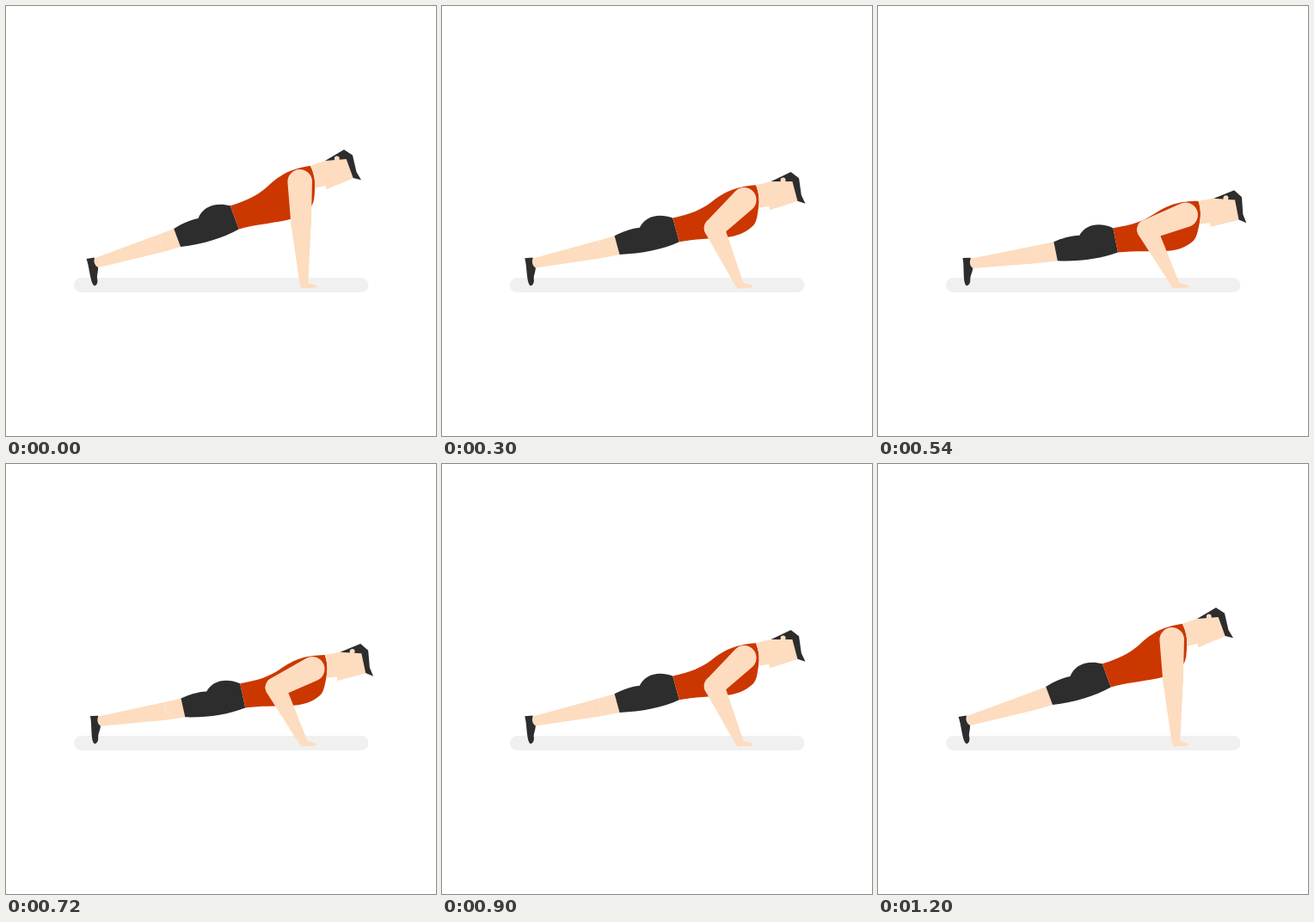
An HTML page for the animation above (1.24 s loop, 500 px wide and 500 px high).

```html
<!DOCTYPE html>
<html lang="en">
<head>
<meta charset="utf-8">
<title>Push-up</title>
<style>
  html, body { margin: 0; width: 100%; height: 100%; overflow: hidden; background: #fff; }
  svg { display: block; width: 100%; height: 100%; }
  .skin { fill: #fddcbf; }
  .dark { fill: #2d2d2d; }
  .shirt { fill: #cc3700; }
</style>
</head>
<body>
<svg viewBox="0 0 500 500">
  <rect x="79" y="316" width="342.5" height="17" rx="8.5" fill="#f0f0f0"/>
  <g id="body">
    <path class="dark" d="M93.5 294L102.5 292.5L107 303.5C107.5 309 105 314 106.3 318C107 323 104.500 325.500 102.800 325.300C100 324 98.500 317 97 309C96 303 95 298 93.500 294Z"/>
    <path class="skin" d="M103 293.300L177.500 265.700L181.700 286.300L107.500 304C103.500 303 101.300 297 103 293.300Z"/>
    <path class="skin" d="M177.500 265.700L195.500 259L203 280L181.700 286.300Z"/>
    <path class="dark" d="M195.200 259C204 253.500 213 249 223.500 247C228 234 243 227.500 260.800 232.300L270.800 259.500C252 270 229 277 203 280Z"/>
    <path class="shirt" d="M260.800 232.300C281 226 293 220 304 210C320 195 332 189.500 353.800 185.800C358 194 360 203 359 214C358.500 224 358 230 354 234C346 243 336 247 324 249.500C306 253 288 254.500 270.800 259.500Z"/>
    <path class="skin" d="M353.800 185.800L371.500 179.800L371.500 208.800L359.200 212C360 203 358 194 353.800 185.800Z"/>
    <path class="skin" d="M364.300 187L371.500 179.500L396 177.500L404.500 200L372.500 213.300Z"/>
    <path class="dark" d="M371 180L393 167L403 173.500L407.500 193L413 202.300L403.700 200L395.700 178Z"/>
    <circle class="skin" cx="384.800" cy="177.400" r="3"/>
  </g>
  <path class="skin" d="M342 326L344 328.500L360.500 327.500Q361.700 325.500 359 324.300L350 322Z"/>
  <path class="skin" id="upper"/>
  <path class="skin" id="fore"/>
</svg>
<script>
const $ = id => document.getElementById(id);
const TOE = { x: 103, y: 325 };
const SHOULDER = { x: 341.7, y: 204, r: 14.3 };
const WRIST = { x: 346.5, y: 325, r: 4.7 };
const ELBOW_R = 11.8, UPPER = 48, FORE = 73.1;
const LOOP = 1240, MOVE = 1200, STEP = 20, MAX_DEG = 10;

function turn(p, deg) {
  const a = deg * Math.PI / 180, c = Math.cos(a), s = Math.sin(a);
  const x = p.x - TOE.x, y = p.y - TOE.y;
  return { x: TOE.x + x * c - y * s, y: TOE.y + x * s + y * c, r: p.r };
}

// Two-bone solve: the elbow bends back between shoulder and fixed wrist.
function bend(s) {
  const dx = WRIST.x - s.x, dy = WRIST.y - s.y, d = Math.hypot(dx, dy);
  const along = (UPPER ** 2 - FORE ** 2 + d * d) / (2 * d);
  const out = Math.sqrt(Math.max(0, UPPER ** 2 - along ** 2));
  return {
    x: s.x + (dx * along - dy * out) / d,
    y: s.y + (dy * along + dx * out) / d,
    r: ELBOW_R
  };
}

// Tapered limb; the far end may be flat.
function limb(a, b, flat) {
  const d = Math.hypot(b.x - a.x, b.y - a.y);
  const nx = (a.y - b.y) / d, ny = (b.x - a.x) / d;
  const at = (p, k) => (p.x + nx * p.r * k).toFixed(2) + ' ' + (p.y + ny * p.r * k).toFixed(2);
  const cap = (p, k) => `A${p.r} ${p.r} 0 0 1 ${at(p, k)}`;
  return `M${at(a, 1)}${cap(a, -1)}L${at(b, -1)}${flat ? 'L' + at(b, 1) : cap(b, 1)}Z`;
}

function draw(ms) {
  const t = Math.min(MOVE, Math.floor(ms % LOOP / STEP) * STEP);
  const deg = MAX_DEG * (1 - Math.abs(1 - 2 * t / MOVE));
  const shoulder = turn(SHOULDER, deg), elbow = bend(shoulder);
  $('body').setAttribute('transform', `rotate(${deg} ${TOE.x} ${TOE.y})`);
  $('upper').setAttribute('d', limb(shoulder, elbow, false));
  $('fore').setAttribute('d', limb(elbow, WRIST, true));
}

const start = performance.now();
function tick() {
  draw(performance.now() - start);
  requestAnimationFrame(tick);
}
tick();
</script>
</body>
</html>
```
